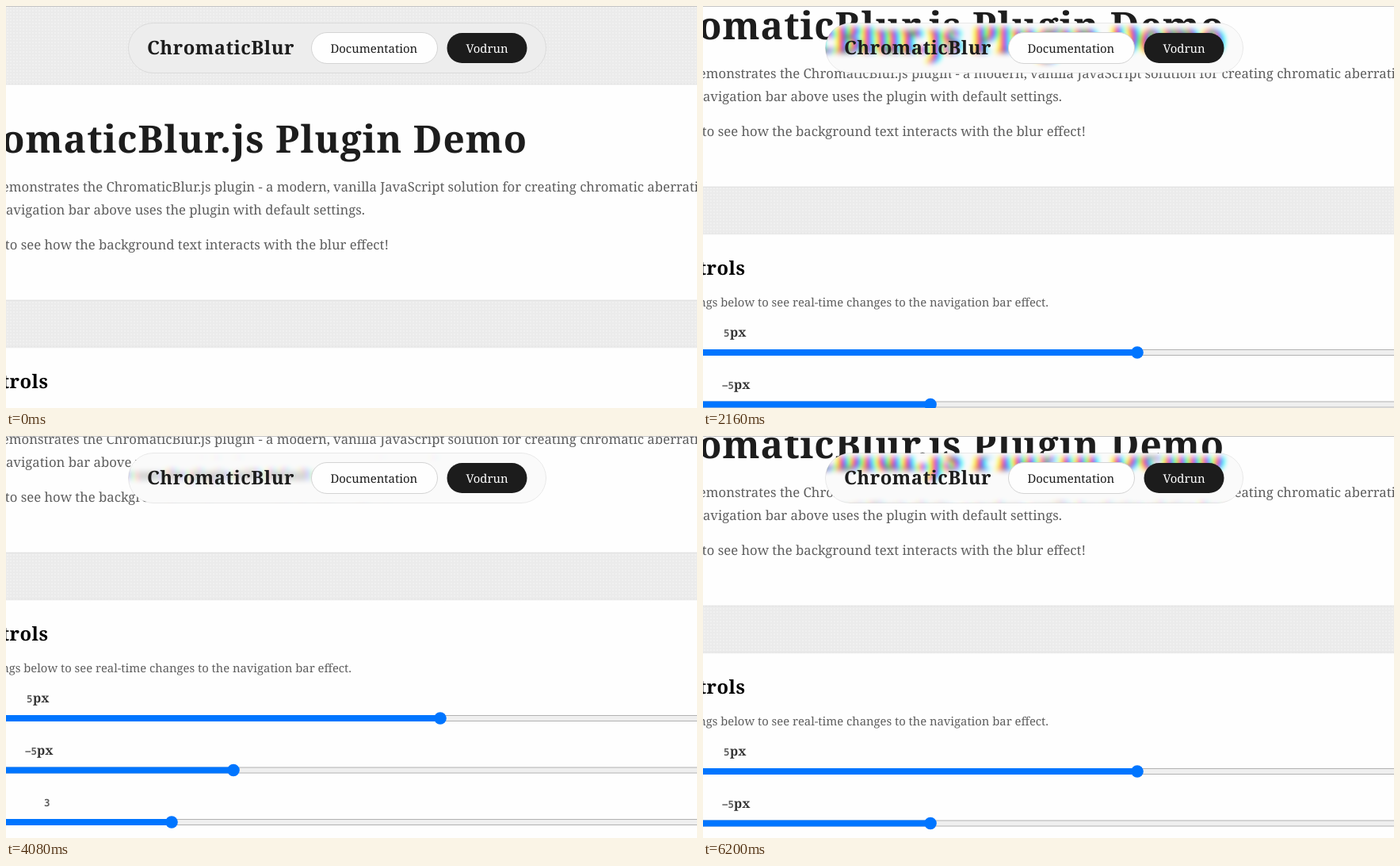
Write an HTML page that moves like this. It is 872x507 px and loops after 6.83 s.

```html
<!DOCTYPE html>
<html lang="en">
<head>
<meta charset="utf-8">
<title>ChromaticBlur demo</title>
<style>
  html, body { margin: 0; width: 100%; height: 100%; overflow: hidden; background: #ebebeb; }
  svg { display: block; width: 872px; height: 507px; }
  text { font: 16.7px "Noto Serif", Georgia, serif; fill: #5e5e5e; text-rendering: geometricPrecision; white-space: pre; }
  .end { text-anchor: end; }
  .mid { text-anchor: middle; }
  .title { font-size: 47.8px; font-weight: 700; fill: #1d1d1d; letter-spacing: .02em; }
  .head { font-size: 23.8px; font-weight: 700; fill: #000; letter-spacing: .02em; }
  .brand { fill: #1d1d1d; }
  .small { font-size: 14.8px; }
  .label { font-size: 15.8px; font-weight: 700; fill: #333; }
  .value { font: 700 12.5px "DejaVu Sans Mono", monospace; }
  .link { font-size: 14.9px; fill: #1d1d1d; }
</style>
</head>
<body>
<svg viewBox="0 0 872 507">
  <defs>
    <pattern id="grain" width="4" height="4" patternUnits="userSpaceOnUse">
      <rect width="4" height="4" fill="#ebebeb"/>
      <rect x="1" y="1" width="2" height="2" fill="#f0f0f0"/>
    </pattern>
    <clipPath id="pill"><rect x="154.5" y="21.5" width="527" height="63" rx="31.5"/></clipPath>
    <clipPath id="below"><rect y="13" width="872" height="494"/></clipPath>
    <filter id="chroma" filterUnits="userSpaceOnUse" x="110" y="-10" width="620" height="130" color-interpolation-filters="sRGB">
      <feColorMatrix in="SourceGraphic" values="1 0 0 0 0  0 0 0 0 0  0 0 0 0 0  0 0 0 1 0"/>
      <feOffset dx="5" result="r"/>
      <feColorMatrix in="SourceGraphic" values="0 0 0 0 0  0 1 0 0 0  0 0 0 0 0  0 0 0 1 0" result="g"/>
      <feColorMatrix in="SourceGraphic" values="0 0 0 0 0  0 0 0 0 0  0 0 1 0 0  0 0 0 1 0"/>
      <feOffset dx="-5" result="b"/>
      <feBlend in="r" in2="g" mode="screen"/>
      <feBlend in2="b" mode="screen"/>
      <feGaussianBlur stdDeviation="2.6 3.6"/>
      <feColorMatrix values=".72 0 0 0 .265  0 .72 0 0 .265  0 0 .72 0 .265  0 0 0 1 0"/>
    </filter>
  </defs>

  <g id="back">
    <rect y="-60" width="872" height="640" fill="url(#grain)"/>
    <g class="scroll" fill="#fefefe" stroke="#000" stroke-opacity=".04" stroke-width="2">
      <rect x="-20" y="99" width="920" height="272"/>
      <rect x="-20" y="430.5" width="920" height="600"/>
    </g>
  </g>

  <g id="copy"><g class="scroll">
    <text class="title end" x="658" y="185">ChromaticBlur.js Plugin Demo</text>
    <text class="end" x="409" y="234">This page demonstrates the ChromaticBlur.js plugin - a modern,</text>
    <text x="413" y="234">vanilla JavaScript solution for creating chromatic aberration effects.</text>
    <text class="end" x="453" y="263">The navigation bar above uses the plugin with default settings.</text>
    <text class="end" x="483" y="306.5">Scroll down to see how the background text interacts with the blur effect!</text>
    <text class="head end" x="53.5" y="482">Controls</text>
    <text class="small end" x="436" y="521.5">Adjust the settings below to see real-time changes to the navigation bar effect.</text>
    <g id="sliders"></g>
  </g></g>

  <!-- the page seen again through the navigation bar -->
  <g clip-path="url(#pill)">
    <g filter="url(#chroma)">
      <g transform="matrix(1 0 0 1.1 0 12.5)">
        <use href="#back"/>
        <g clip-path="url(#below)"><use href="#copy"/></g>
      </g>
    </g>
  </g>
  <rect x="154.5" y="21.5" width="527" height="63" rx="31.5" fill="none" stroke="#000" stroke-opacity=".08"/>
  <text class="head brand" x="178" y="61">ChromaticBlur</text>
  <rect x="385.5" y="33.5" width="159" height="39" rx="19.5" fill="#fefefe" stroke="#d4d4d4"/>
  <text class="link mid" x="464.3" y="58.5">Documentation</text>
  <rect x="556.5" y="34" width="101" height="38" rx="19" fill="#1c1c1c"/>
  <text class="link mid" x="607" y="58.5" style="fill:#fff">Vodrun</text>
  <rect width="872" height="1" fill="#c4c4c4"/>
</svg>

<script>
const LOOP = 6830, STEP = 87.76;

// label end, label, value x, value, unit x, thumb x
const sliders = [
  [-20, 'Red Offset:', 26, '5', 34, 548],
  [-20, 'Blue Offset:', 24, '−5', 39, 287],
  [1, 'Blur Radius:', 48, '3', 0, 209],
  [54, 'Displacement Scale:', 93, '50', 0, 244]
];
document.getElementById('sliders').innerHTML = sliders.map(([end, label, vx, value, ux, thumb], i) => `
  <g transform="translate(0 ${i * 65.5})">
    <text class="label end" x="${end}" y="560">${label}</text>
    <text class="value" x="${vx}" y="560">${value}</text>
    ${ux ? `<text class="label" x="${ux}" y="560">px</text>` : ''}
    <rect x="-20" y="576.5" width="920" height="7" fill="#efefef" stroke="#b2b2b2"/>
    <rect x="-20" y="576" width="${thumb + 20}" height="8" fill="#0075ff"/>
    <circle cx="${thumb}" cy="580" r="7.8" fill="#0075ff"/>
  </g>`).join('');

// time, scroll distance
const path = [
  [0, 0], [1020, 0], [1110, 4], [1370, 30], [1720, 90], [1900, 117], [2070, 137], [2150, 143],
  [2610, 143], [2700, 147], [2960, 200], [3120, 250], [3290, 283], [3380, 285],
  [3650, 285], [3740, 281], [3910, 262], [4080, 225], [4350, 136], [4520, 94], [4700, 51],
  [4870, 30], [4950, 26], [5120, 45], [5410, 112], [5660, 157], [LOOP, 157]
];

function scrollAt(t) {
  const i = path.findIndex(p => p[0] > t);
  const [t0, a] = path[i - 1], [t1, b] = path[i];
  return Math.round(a + (b - a) * (t - t0) / (t1 - t0));
}

// the page moves in even steps rather than continuously
function stepped(t) {
  const k = Math.floor((t - 1095) / STEP);
  return k < 0 ? 0 : 1100 + k * STEP;
}

const layers = document.querySelectorAll('.scroll');
const start = performance.now();
function draw() {
  const t = (performance.now() - start) % LOOP;
  const y = scrollAt(Math.min(stepped(t), LOOP - 1));
  layers.forEach(g => g.setAttribute('transform', `translate(0 ${-y})`));
  requestAnimationFrame(draw);
}
draw();
</script>
</body>
</html>
```
